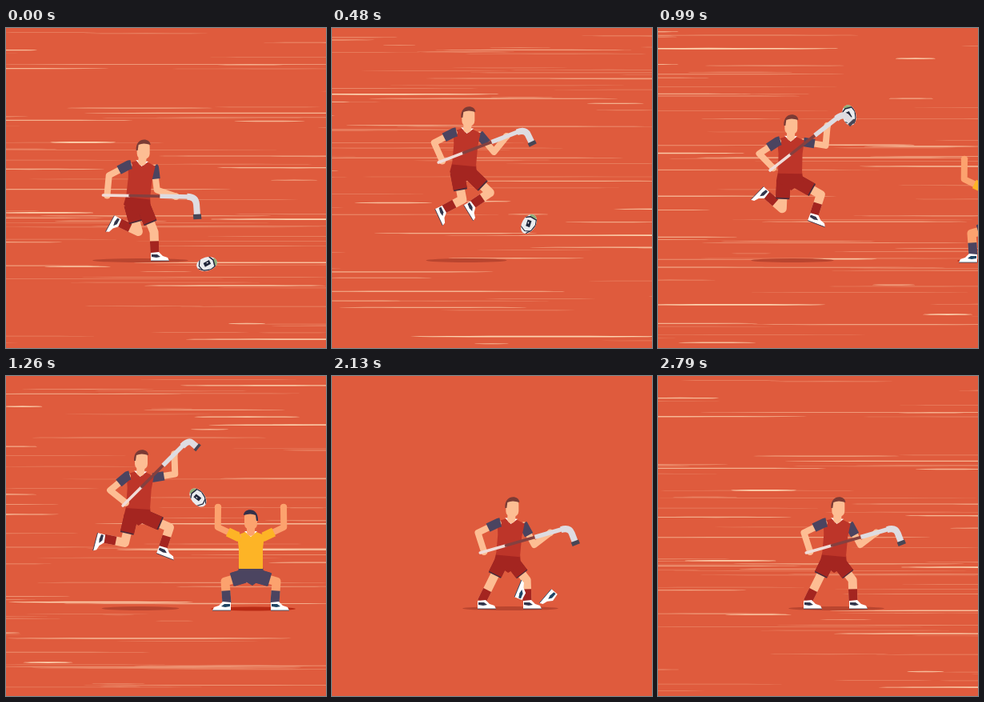
Recreate the animation shown at these times as an HTML page with a canvas. Size 400 by 400 pixels, loop 2820 ms.

```html
<!DOCTYPE html>
<html>
<head>
<meta charset="utf-8">
<style>
html, body { margin: 0; width: 100%; height: 100%; overflow: hidden; background: #df5b3d; }
canvas { display: block; }
</style>
</head>
<body>
<canvas id="stage" width="400" height="400"></canvas>
<script>
const ctx = document.getElementById('stage').getContext('2d');
const LOOP = 2820, STEP = 30, SWEEP = LOOP / 7;
const MEET = 1260, CLASH = 1740, REST = 2190;
const SPINE = 45, SHIN = 27, UPPER_ARM = 28, FOREARM = 25, GROUND = 283;
const WHITE = '#ffffff', NAVY = '#4b4460', DEEP_RED = '#a42520', GREY = '#dedce1';

const playerStyle = { skin: '#fdbd93', hair: '#7b3b35', shirt: '#bd3529', sleeve: NAVY,
  shorts: DEEP_RED, hem: '#4b2b3b', sock: DEEP_RED, sole: '#33364c', elbows: [1, 1], knees: [-1, -1] };
const rivalStyle = { skin: '#fca26e', hair: '#33304a', shirt: '#fdb426', sleeve: '#fdb426',
  shorts: NAVY, hem: NAVY, sock: NAVY, sole: '#1f4564', elbows: [-1, 1], knees: [1, -1], mirrored: true };

// Time, neck x y, lean, stick angle, left ankle x y, right ankle x y.
const playerKeys = [
  [0, 170, 168, -5, 1, 141, 243, 186, 282],
  [480, 169, 127, -4, -21, 139, 227, 175, 221],
  [990, 166, 137, -1, -38, 135, 208, 195, 234],
  [MEET, 168, 121, -3, -45, 122, 203, 196, 215],
  [CLASH, 208, 181, 5, -22, 184, 281, 264, 262],
  [2130, 224, 180, -4, -16, 187, 282, 244, 282],
  [LOOP, 224, 180, -4, -16, 187, 282, 244, 282]
];
// Time, x, y.
const ballKeys = [[0, 251, 295], [480, 246, 245], [990, 239, 109], [MEET, 240, 152], [CLASH, 350, 173], [1900, 425, 168]];

const clamp = u => Math.max(0, Math.min(1, u));
const smooth = u => clamp(u) ** 2 * (3 - 2 * clamp(u));
const mix = (a, b, u) => a.map((v, k) => v + (b[k] - v) * u);
const polar = ([x, y], degrees, r) => [x + r * Math.cos(degrees * Math.PI / 180), y + r * Math.sin(degrees * Math.PI / 180)];

function random(n) {
  const x = Math.sin(n * 12.9898 + 4.1) * 43758.5453;
  return x - Math.floor(x);
}

// Monotone cubic through the keys: smooth, never overshoots.
function sample(keys, t) {
  const last = keys.length - 1;
  let i = 0;
  while (i < last - 1 && t >= keys[i + 1][0]) i++;
  const a = keys[i], b = keys[i + 1], d = b[0] - a[0], u = clamp((t - a[0]) / d);
  return a.slice(1).map((v, n) => {
    const k = n + 1;
    const slope = j => (keys[j + 1][k] - keys[j][k]) / (keys[j + 1][0] - keys[j][0]);
    const tangent = j => {
      const p = slope(Math.max(j - 1, 0)), q = slope(Math.min(j, last - 1));
      return p * q <= 0 ? 0 : 2 * p * q / (p + q);
    };
    return v + (b[k] - v) * smooth(u) + d * u * (1 - u) * ((1 - u) * tangent(i) - u * tangent(i + 1));
  });
}

// Middle joint of a two-bone limb from a to b.
function joint(a, b, upper, lower, side) {
  const dx = b[0] - a[0], dy = b[1] - a[1], d = Math.hypot(dx, dy);
  const along = (upper ** 2 - lower ** 2 + d * d) / (2 * d);
  const out = side * Math.sqrt(Math.max(0, upper ** 2 - along ** 2));
  return [a[0] + (dx * along - dy * out) / d, a[1] + (dy * along + dx * out) / d];
}

function stroke(points, color, width, cap = 'butt') {
  ctx.beginPath();
  points.forEach(p => ctx.lineTo(...p));
  Object.assign(ctx, { strokeStyle: color, lineWidth: width, lineCap: cap, lineJoin: 'round' });
  ctx.stroke();
}

function fill(points, color) {
  ctx.beginPath();
  points.forEach(p => ctx.lineTo(...p));
  ctx.fillStyle = color;
  ctx.fill();
}

function oval(x, y, rx, ry, color) {
  ctx.beginPath();
  ctx.ellipse(x, y, rx, ry, 0, 0, 7);
  ctx.fillStyle = color;
  ctx.fill();
}

function at([x, y], degrees, mirrored, draw) {
  ctx.save();
  ctx.translate(x, y);
  if (mirrored) ctx.scale(-1, 1);
  ctx.rotate(degrees * Math.PI / 180);
  draw();
  ctx.restore();
}

function speedLines(t) {
  for (let k = 0; k < 75; k++) {
    const phase = random(k) * SWEEP;
    const pass = Math.floor((t + phase) / SWEEP);
    const start = (pass * SWEEP - phase + LOOP) % LOOP;
    if (start > 1220 && start < REST) continue;
    const seed = 100 + k * 7 + pass % 7;
    const length = 40 + 400 * random(seed + 0.3);
    const x = 400 - (400 + length) * ((t + phase) / SWEEP - pass);
    const bright = random(seed + 0.7) ** 3;
    ctx.globalAlpha = 0.3 + 0.65 * bright;
    oval(x + length / 2, 4 + 394 * random(seed), length / 2, 0.4 + 0.5 * bright, '#ffdcb8');
  }
  ctx.globalAlpha = 1;
}

function shoe(ankle, angle, mirrored, sole) {
  at(ankle, angle, mirrored, () => {
    fill([[-5, -1], [5, -2], [10, 3], [16, 5], [18, 9], [-5, 9]], WHITE);
    fill([[-4, 1], [3, 1], [7, 4], [2, 5], [-4, 4]], sole);
    stroke([[-5, 9], [18, 9]], sole, 0.8);
  });
}

// The foot follows the shin and flattens as it nears the ground.
function footAngle(knee, ankle, mirrored) {
  const dx = ankle[0] - knee[0], dy = ankle[1] - knee[1];
  const shin = Math.atan2(dy, mirrored ? -dx : dx) * 180 / Math.PI;
  return (shin - 87) * (1 - clamp((ankle[1] - 268) / 12));
}

function head(center, style) {
  at(center, 0, style.mirrored, () => {
    ctx.beginPath();
    ctx.roundRect(-8, -11, 16, 22, [6, 6, 7, 7]);
    ctx.fillStyle = style.skin;
    ctx.fill();
    ctx.beginPath();
    ctx.moveTo(-9, 0);
    ctx.bezierCurveTo(-10, -18, 9, -16, 9, -7);
    ctx.quadraticCurveTo(0, -10, -6, -7);
    ctx.lineTo(-7, 0);
    ctx.fillStyle = style.hair;
    ctx.fill();
  });
}

// Point in the body's own frame: a across the chest, b down the spine.
function bodyFrame(neck, lean) {
  const s = lean / SPINE, c = Math.sqrt(1 - s * s);
  return (a, b) => [neck[0] + a * c + b * s, neck[1] - a * s + b * c];
}

function legs(on, ankles, thigh, style, barefoot) {
  ankles.forEach((ankle, k) => {
    const hip = on(k ? 8 : -8, SPINE + 9);
    const knee = joint(hip, ankle, thigh, SHIN, style.knees[k]);
    const mirrored = style.mirrored && k == 0;
    stroke([hip, knee, ankle], style.skin, 11);
    stroke([mix(knee, ankle, 0.42), ankle], style.sock, 11);
    if (!barefoot) shoe(ankle, footAngle(knee, ankle, mirrored), mirrored, style.sole);
    stroke([hip, mix(hip, knee, 0.66)], style.hem, 17);
    stroke([hip, mix(hip, knee, 0.61)], style.shorts, 17.5);
  });
  fill([on(-15, 43), on(15, 43), on(17, 55), on(2, 66), on(-17, 55)], style.shorts);
}

function arm(on, hand, k, style) {
  const shoulder = on(k ? 16 : -16, 5);
  const elbow = joint(shoulder, hand, UPPER_ARM, FOREARM, style.elbows[k]);
  stroke([shoulder, elbow, hand], style.skin, 8, 'round');
  oval(...hand, 4.3, 4.3, style.skin);
  stroke([on(k ? 15 : -13, 4), shoulder, mix(shoulder, elbow, 0.5)], style.sleeve, 11.5);
}

function figure({ neck, lean, hands, ankles, thigh }, style, barefoot) {
  const on = bodyFrame(neck, lean);
  legs(on, ankles, thigh, style, barefoot);
  arm(on, hands[1], 1, style);
  fill([on(-7, -1), on(7, -1), on(17, 3), on(15, 20), on(15, SPINE), on(-15, SPINE), on(-15, 20), on(-17, 3)], style.shirt);
  arm(on, hands[0], 0, style);
  fill([on(-8, -2), on(8, -2), on(0, 5)], WHITE);
  stroke([on(0, -15), on(0, -1)], style.skin, 10, 'round');
  head(on(0, -15), style);
}

function playerAt(t) {
  const [x, y, lean, angle, lx, ly, rx, ry] = sample(playerKeys, t);
  // The lower the stick, the further back its end is held.
  const butt = [x - 48 - 0.58 * angle, y + 41];
  return { neck: [x, y], lean, angle, butt, thigh: 35 - 9 * smooth((t - MEET) / (CLASH - MEET)),
    hands: [5, 91].map(r => polar(butt, angle, r)), ankles: [[lx, ly], [rx, ry]] };
}

function stick({ butt, angle }) {
  const along = r => polar(butt, angle, r);
  const bend = along(116), blade = 27 + angle / 4;
  const down = u => polar(bend, angle + 85, blade * u);
  stroke([butt, along(33)], '#f0dcd8', 3.6, 'round');
  stroke([along(32), along(71)], '#85403f', 3.6);
  stroke([along(71), along(108)], GREY, 5.5);
  ctx.beginPath();
  ctx.moveTo(...along(105));
  ctx.quadraticCurveTo(...bend, ...down(0.35));
  ctx.lineTo(...down(0.85));
  ctx.strokeStyle = GREY;
  ctx.lineWidth = 8;
  ctx.stroke();
  stroke([down(0.8), down(1.03)], '#494655', 10);
}

function ball(t) {
  at(sample(ballKeys, t), -15 - 0.09 * t, false, () => {
    const dark = '#20263a';
    oval(0, 0, 13, 8.5, '#e9ebee');
    ctx.clip();
    oval(12, 0, 3, 6, '#8fae78');
    stroke([[-12, 3], [-5, 7], [3, 8], [10, 5]], dark, 1.2);
    stroke([[-7, -8], [-10, 0], [-7, 6]], dark, 1.2);
    stroke([[5, -8], [9, -3], [9, 5]], dark, 1.5);
    fill([[-4, -2], [4, -4], [5, 1], [-3, 3]], dark);
    stroke([[0, -1], [2, -1.5]], WHITE, 1.2);
  });
}

// Waits with spread limbs while the ground scrolls, then leaps into the clash.
function rivalAt(t) {
  const leap = smooth((t - MEET) / (CLASH - MEET));
  const neck = [306 - 21 * leap + 0.437 * Math.max(0, MEET - t), 196 - 35 * leap];
  const lean = -8 * leap, stance = 30 - 10 * leap;
  const on = bodyFrame(neck, lean);
  return { neck, lean, leap, thigh: 25, hands: [on(-41, -32), on(41, -32)],
    ankles: [on(-stance, SPINE + 43), on(stance, SPINE + 43)] };
}

function rival(t) {
  const pose = rivalAt(t);
  const flight = Math.max(0, (t - CLASH) / 300);
  if (flight < 1.3) at([285 + 190 * flight, 161 - 60 * flight], 45 * flight, false, () => {
    ctx.translate(-285, -161);
    figure(pose, rivalStyle, flight > 0);
  });
  if (flight > 0) pose.ankles.forEach((ankle, k) => looseShoe(ankle, k == 0, t));
}

// Left behind: tumbles to the ground, then scrolls away with it.
function looseShoe([x, y], mirrored, t) {
  const u = clamp((t - CLASH) / (REST - CLASH));
  const place = [x - 13 * u - 0.5 * Math.max(0, t - REST), y + (GROUND - y) * u - 24 * u * (1 - u)];
  shoe(place, 38 + (mirrored ? 322 : 142) * u ** 3, mirrored, rivalStyle.sole);
}

function shadows(player, rivalPose, t) {
  const height = GROUND - Math.max(...player.ankles.map(p => p[1]));
  oval(player.neck[0] + player.lean + 3, 290.5, 60 - height * 0.17, 2.5, '#b9452f');
  ctx.globalAlpha = clamp((1900 - t) / 160);
  oval(rivalPose.neck[0] - 18 * rivalPose.leap + 3, 291, 53 - 27 * rivalPose.leap, 2.4, '#b82a14');
  ctx.globalAlpha = 1;
}

function draw() {
  const t = Math.floor(performance.now() % LOOP / STEP) * STEP;
  const player = playerAt(t);
  ctx.fillStyle = '#df5b3d';
  ctx.fillRect(0, 0, 400, 400);
  speedLines(t);
  shadows(player, rivalAt(t), t);
  ball(t);
  figure(player, playerStyle);
  stick(player);
  rival(t);
  requestAnimationFrame(draw);
}
draw();
</script>
</body>
</html>
```
